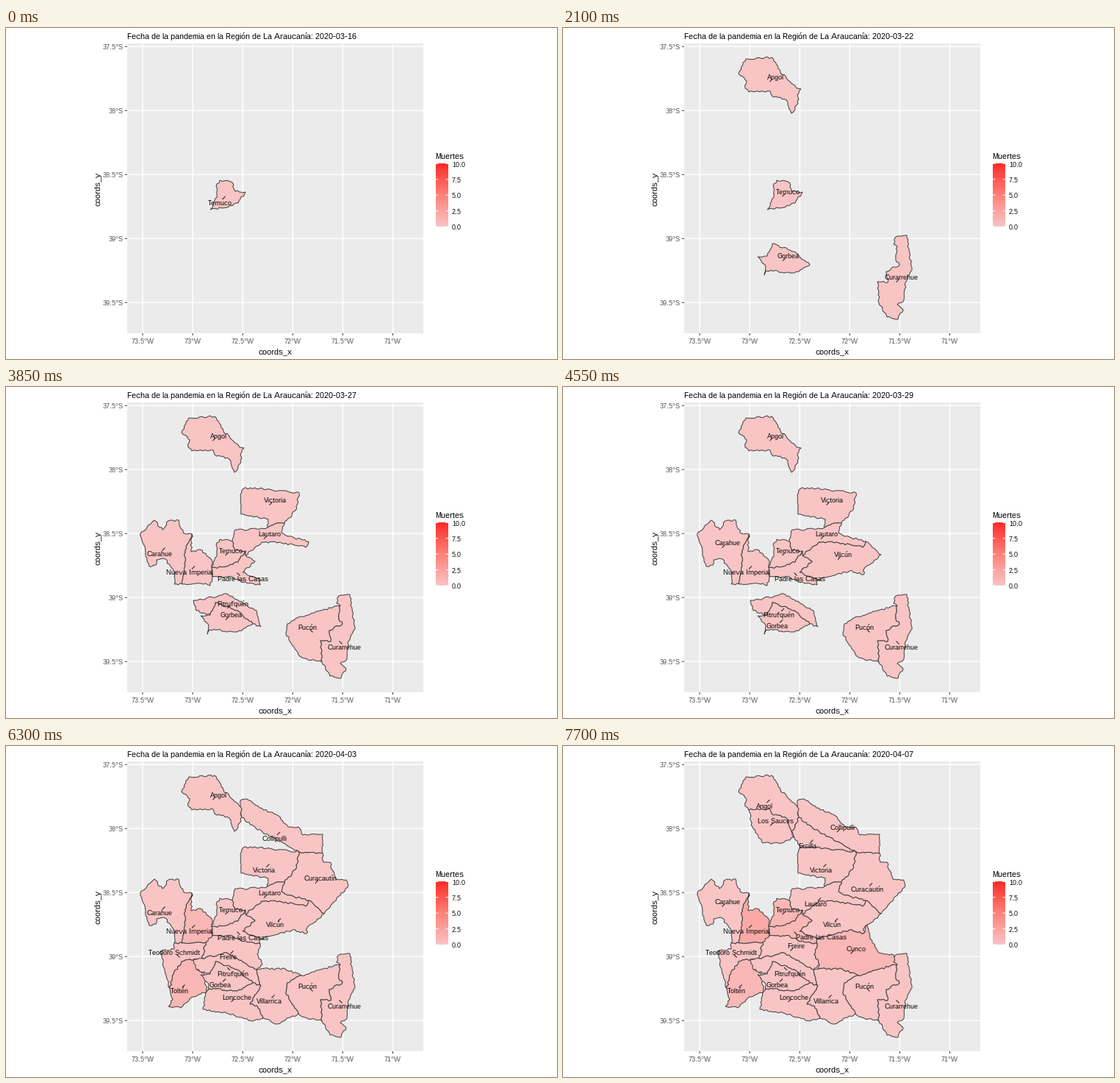
Animation, 750 px wide and 450 px high, one loop 8000 ms. Source, as a matplotlib script:

```python
import math
import random

import matplotlib.pyplot as plt
from matplotlib.animation import FuncAnimation
from matplotlib.colors import LinearSegmentedColormap
from matplotlib.patches import Polygon, Rectangle

plt.rcParams.update({"font.family": "Liberation Sans", "text.hinting": "native",
                     "text.hinting_factor": 1})

W, H, DPI = 750, 450, 100
PX = 72 / DPI
STEP, TICKS_PER_DAY, FRAMES = 50, 7, 160
REDS = LinearSegmentedColormap.from_list("reds", ["#F8C4C4", "#FE8279", "#FF2B28"])
NUDGE = 7.5
SIDES = {"ne": (1, -1), "nw": (-1, -1), "se": (1, 1), "sw": (-1, 1), "e": (4.9, 0.8)}

fig = plt.figure(figsize=(W / DPI, H / DPI), dpi=DPI, facecolor="white")
ax = fig.add_axes([0, 0, 1, 1])


def text(x, y, s, size, ha="center", color="black"):
    """Place text with its capitals centred on y."""
    return ax.text(x, y + 0.36 * size, s, fontsize=size * PX, ha=ha,
                   va="baseline", color=color, zorder=6)


def stroke(xs, ys, color, width=1, z=1):
    return ax.plot(xs, ys, color=color, lw=width * PX, zorder=z, snap=False,
                   solid_capstyle="butt")[0]


def line(*v):
    return list(zip(v[::2], v[1::2]))


def rough(a, b):
    """Inner points of a jagged edge; the same from either end."""
    lo, hi = min(a, b), max(a, b)
    rng = random.Random(lo[0] * 7919 + lo[1] * 104729 + hi[0] * 31 + hi[1])
    dx, dy = hi[0] - lo[0], hi[1] - lo[1]
    size = math.hypot(dx, dy)
    n = max(1, round(size / 3))
    pts = []
    for i in range(1, n):
        k = rng.uniform(-1.3, 1.3) / size
        pts.append((lo[0] + dx * i / n - dy * k, lo[1] + dy * i / n + dx * k))
    return pts if a == lo else pts[::-1]


def outline(border):
    ring = [p for i, p in enumerate(border) if p != border[i - 1]]
    out = []
    for a, b in zip(ring, ring[1:] + ring[:1]):
        out += [a] + rough(a, b)
    return out


def passed(day, days):
    return sum(d <= day for d in days)


class Town:
    """A commune whose label hops between sides of its centre on given days."""

    def __init__(self, name, x, y, sides, days, border, deaths=()):
        self.x, self.y = x, y
        self.sides, self.days, self.deaths = sides.split(), days, deaths
        self.area = ax.add_patch(Polygon(outline(border), closed=True, ec="#404040",
                                         lw=PX, zorder=3))
        self.mark = stroke([], [], "black", 0.9, 5)
        self.label = text(0, 0, name, 9)

    def show(self, day):
        hops = passed(day, self.days)
        for part in (self.area, self.mark, self.label):
            part.set_visible(hops > 0)
        if not hops:
            return
        self.area.set_facecolor(REDS(passed(day, self.deaths) / 10))
        dx, dy = SIDES[self.sides[(hops - 1) % len(self.sides)]]
        tip = 4 * math.copysign(1, dx), 4 * math.copysign(1, dy)
        self.mark.set_data([self.x, self.x + tip[0]],
                           [self.y - 1, self.y - 1 + tip[1]])
        self.label.set_position((self.x + NUDGE * dx, self.y + NUDGE * dy + 3.2))


# Panel, grid and axes
ax.add_patch(Rectangle((165, 21), 403, 394, fc="#EBEBEB", lw=0, zorder=0))
for i in range(6):
    x = 186 + 68.1 * i
    stroke([x, x], [21, 415], "white", 1.5)
    stroke([x, x], [415, 418], "#333333")
    text(x, 426, f"{73.5 - i / 2:g}°W", 9, color="#4D4D4D")
for i in range(5):
    y = 25.2 + 87 * i
    stroke([165, 568], [y, y], "white", 1.5)
    stroke([162, 165], [y, y], "#333333")
    text(160, y + 1, f"{37.5 + i / 2:g}°S", 9, "right", "#4D4D4D")
text(366.5, 439.5, "coords_x", 11)
ax.text(125.5, 218.5, "coords_y", fontsize=11 * PX, rotation=90,
        ha="center", va="center")
title = text(165, 11.2, "", 11, "left")

# Legend
text(584, 174.5, "Muertes", 11, "left")
ax.imshow([[i / 299] for i in range(300)], cmap=REDS, origin="lower", aspect="auto",
          extent=(585, 602, 270, 184), interpolation="nearest", zorder=2)
for i in range(5):
    y = 270 - 21.4 * i
    for x in (585, 598.6):
        stroke([x, x + 3.4], [y, y], "white", 1, 3)
    text(607, y + 1, f"{2.5 * i:.1f}", 9, "left")
ax.set_xlim(0, W)
ax.set_ylim(H, 0)
ax.axis("off")

# Borders shared by two communes
angol_s = line(311, 116, 304, 98, 284, 92, 282, 86, 253, 87)
colli_s = line(399, 144, 385, 137, 340, 112, 321, 97)
vict_n = line(323, 138, 345, 138, 399, 144)
vict_e = line(399, 144, 394, 168, 379, 185)
vict_s = line(379, 185, 366, 186, 356, 191)
laut_e = line(379, 185, 375, 198, 384, 203, 412, 210)
laut_s = line(412, 210, 408, 218, 372, 211, 348, 211, 326, 229)
tem_ne = line(308, 210, 312, 222, 326, 223)
tem_s = line(326, 223, 316, 238, 300, 244, 278, 247)
padre_e = line(326, 229, 339, 237, 322, 252, 346, 262)
padre_s = line(346, 269, 320, 265, 308, 258, 281, 258)
vilc_e = line(412, 210, 433, 228)
vilc_s = line(409, 255, 390, 250, 370, 256, 346, 262)
car_e = line(253, 200, 244, 222, 243, 240, 240, 268)
teo_n = line(240, 268, 272, 267)
teo_e = line(272, 267, 267, 289)
tol_n = line(256, 290, 239, 293, 228, 310, 223, 330)
pit_n = line(267, 289, 300, 281, 325, 295, 341, 304)
gor_n = line(278, 310, 285, 293, 315, 304, 336, 322)
gor_s = line(336, 322, 315, 333, 277, 330)
villa_n = line(347, 303, 380, 303, 402, 312)
villa_w = line(347, 326, 332, 351, 342, 353, 350, 370)
puc_n = line(402, 312, 428, 304, 455, 297)
puc_w = line(402, 312, 383, 322, 381, 335, 398, 364)
cur_w = line(455, 297, 453, 316, 458, 322, 440, 331, 442, 346, 428, 345, 430, 374)

towns = [
    Town("Angol", 281.5, 74, "ne sw", [2, 5, 6, 9, 10, 21],
         line(253, 87, 248, 82, 250, 72, 239, 62, 249, 42, 284, 40, 296, 60, 318, 82,
              324, 83, 319, 91, 321, 97, 316, 110) + angol_s),
    Town("Los Sauces", 282, 109.5, "ne", [21],
         line(253, 87, 258, 110, 272, 132, 298, 132, 314, 124) + angol_s),
    Town("Collipulli", 373, 118, "sw ne", [18, 20],
         line(321, 97, 319, 74, 328, 72, 345, 84, 371, 95, 384, 110, 398, 110,
              404, 121, 431, 120, 431, 146) + colli_s),
    Town("Ercilla", 340.5, 128.5, "sw", [20],
         line(321, 97, 316, 110, 311, 116) + vict_n + colli_s),
    Town("Victoria", 358.5, 161.5, "ne sw", [10, 17],
         vict_n + vict_e + vict_s + line(357, 180, 320, 173, 319, 147)),
    Town("Curacautín", 421, 187.5, "ne sw", [17, 20],
         vict_e + laut_e + vilc_e + line(455, 203, 466, 190, 463, 182, 449, 181,
                                         441, 158, 432, 158, 431, 146)),
    Town("Lautaro", 351, 207.5, "ne sw", [11, 20],
         vict_s[::-1] + laut_e + laut_s + tem_ne[::-1] + line(312, 194, 330, 194)),
    Town("Vilcún", 374, 235.5, "ne sw", [12, 17],
         laut_s + padre_e + vilc_s[::-1] + line(410, 247) + vilc_e[::-1]),
    Town("Temuco", 298.5, 230, "sw ne", [0, 2, 4, 5],
         line(278, 247, 287, 230, 286, 215, 291, 207, 303, 208) + tem_ne + tem_s,
         deaths=[20]),
    Town("Padre las Casas", 314.5, 253.5, "se e", [9, 20],
         tem_s[::-1] + padre_e + padre_s, deaths=[21]),
    Town("Carahue", 216.5, 219.5, "ne sw", [7, 8, 9, 10, 12, 17, 20],
         car_e + line(229, 268, 230, 254, 217, 234, 205, 235, 204, 242, 195, 244,
                      183, 199, 202, 181, 213, 194, 221, 182, 235, 181, 241, 198)),
    Town("Nueva Imperial", 257, 244.5, "sw", [8],
         car_e + teo_n + line(278, 270, 281, 258, 280, 235, 264, 221, 252, 224),
         deaths=[15, 20]),
    Town("Teodoro Schmidt", 236.5, 288.5, "nw", [14],
         teo_n + teo_e + tol_n + line(212, 288, 210, 279, 229, 276, 229, 268)),
    Town("Toltén", 243.5, 325.5, "sw", [17],
         tol_n[::-1] + line(261, 305, 270, 309, 273, 334, 254, 341, 238, 356,
                            221, 354, 227, 345), deaths=[17]),
    Town("Freire", 309.5, 279.5, "sw ne", [16, 19],
         padre_s + teo_e + pit_n + line(349, 297, 342, 283)),
    Town("Pitrufquén", 301, 302, "ne sw se", [8, 13, 14],
         pit_n + line(347, 326) + gor_n[::-1] + line(259, 304, 255, 290)),
    Town("Gorbea", 299, 317.5, "ne sw", [5, 8, 9, 13],
         gor_n + gor_s + line(274, 336, 275, 322, 265, 311)),
    Town("Loncoche", 306.5, 349, "ne", [16],
         gor_s[::-1] + villa_w + line(336, 374, 300, 363, 268, 358, 273, 334)),
    Town("Villarrica", 365.5, 339.5, "ne sw", [14, 16],
         villa_n + puc_w + line(369, 378) + villa_w[::-1] + line(341, 304)),
    Town("Cunco", 391.5, 283.5, "ne", [21],
         vilc_s[::-1] + line(414, 243, 418, 262, 430, 281, 450, 284)
         + puc_n[::-1] + villa_n[::-1] + line(349, 297, 342, 283, 346, 269),
         deaths=[21]),
    Town("Pucón", 417.5, 334.5, "nw", [7],
         puc_n + cur_w + line(410, 370) + puc_w[::-1]),
    Town("Curarrehue", 453.5, 346.5, "ne se", [6, 9, 10, 11, 14, 15],
         cur_w + line(441, 393, 456, 396, 463, 383, 455, 376, 464, 370, 466, 346,
                      475, 329, 468, 282, 453, 284, 450, 294)),
]


def draw(i):
    day = i // TICKS_PER_DAY
    date = f"03-{16 + day}" if day < 16 else f"04-{day - 15:02d}"
    title.set_text(f"Fecha de la pandemia en la Región de La Araucanía: 2020-{date}")
    for town in towns:
        town.show(day)
    return []


anim = FuncAnimation(fig, draw, frames=FRAMES, init_func=lambda: draw(0),
                     interval=STEP, repeat=True, repeat_delay=0)
plt.show()
```
